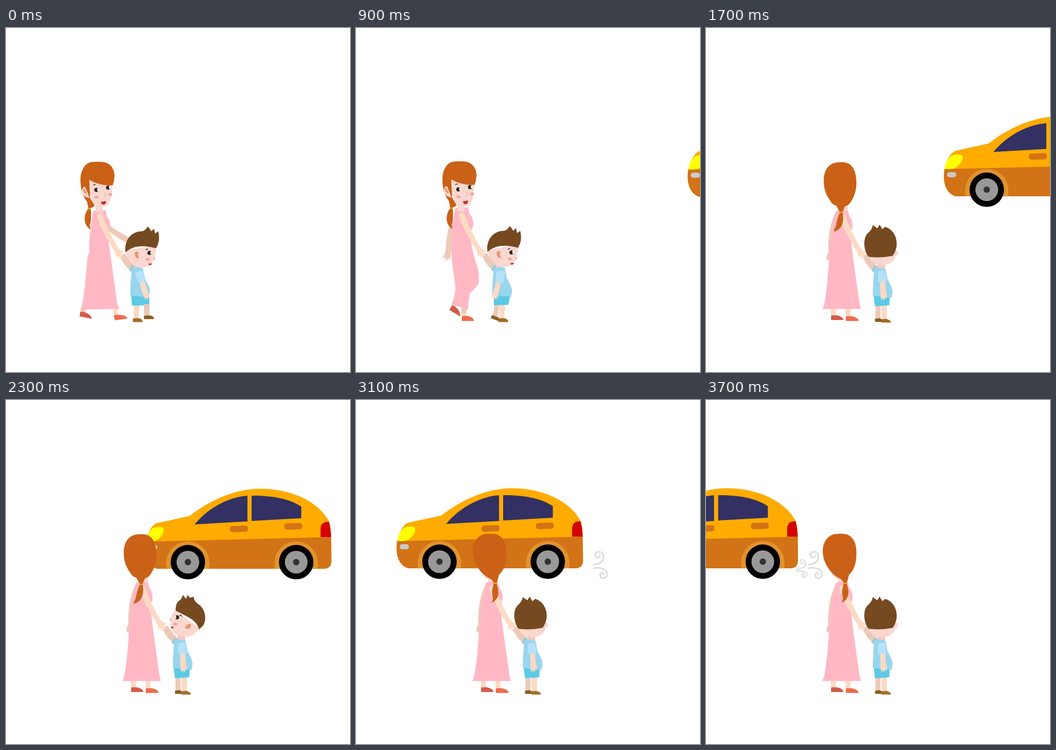
Animation of 748x748 px, one loop 3.9 s. Source, as an HTML page:

```html
<!DOCTYPE html>
<html lang="en">
<head>
<meta charset="utf-8">
<title>Waiting for the car</title>
<style>
html, body { margin: 0; width: 100%; height: 100%; overflow: hidden; background: #fff; }
svg { display: block; width: 100%; height: 100%; }
.hair { fill: #ca6117; } .face { fill: #fad7cf; } .skin { fill: #fcdac4; } .shade { fill: #eccab7; }
.dress { fill: #ffb8c4; } .shoeA { fill: #d45c49; } .shoeB { fill: #ef6c4d; }
.brown { fill: #754a21; } .shirt { fill: #9ad5ee; } .sleeve { fill: #b5e2fa; } .cuff { fill: #a0cbdb; }
.shorts { fill: #5ccae5; } .bootA { fill: #8b5f22; } .bootB { fill: #a26c27; }
.ear { fill: #e6946f; } .blush { fill: #f2a69d; } .lips { fill: #c9302e; } .dark { fill: #2b2624; } .white { fill: #fff; }
.line { fill: none; stroke: #2b2624; stroke-width: 1.5; }
.nose { fill: none; stroke: #dfa99d; stroke-width: 1; }
.band { fill: none; stroke: #f5b400; stroke-width: 2; }
.yellow { fill: #ffab00; } .rust { fill: #d27317; } .arch { fill: #e2932d; } .glass { fill: #333163; }
.puff { fill: none; stroke: #e0e0e0; stroke-linecap: round; }
</style>
</head>
<body>
<svg viewBox="0 0 748 748">
<defs>
  <g id="wheel">
    <path class="arch" d="M243.5,366.500V354.500A47,47 0 0 1 337.5,354.500V366.500Z"/>
    <circle cx="290.5" cy="352.600" r="37.5"/>
    <circle cx="290.5" cy="352.600" r="24.7" fill="#999"/>
    <circle cx="290.5" cy="352.600" r="7" fill="#333"/>
  </g>
  <path id="handle" class="rust" d="M389,274L415,273Q421,273 421,280T415,286.5L389,287.500Q382,287.500 382,280.500T389,274Z"/>
  <g id="eye">
    <circle class="dark" r="4.600"/>
    <path class="white" d="M2,-2.500A2.500,2.500 0 0 1 4.500,2L3,2.500Q1,1 2,-2.500Z"/>
  </g>

  <g id="momHead">
    <path class="face" d="M195,380H210V400H195Z"/>
    <path class="face" d="M180,325L183,365Q188,379 196,386Q205,391 214,389C225,386 231,368 231,340Z"/>
    <path class="hair" d="M162,333C161,310 172,293 186,291.500Q200,290 212,291.500C230,294 238,312 235.500,326Q235,334 232,342C215,343 195,339 181,330L183,370L193,386Q186,393 179,392L176,377C167,366 162,350 162,333Z"/>
    <path class="face" d="M172,345C164,344 162,362 173,367L182,370Z"/>
    <path class="ear" d="M170,348C166,352 168,361 176,360Z"/>
    <path class="hair" d="M179,393Q186,391 185,406Q185,424 182,428L184,438C173,432 168,418 173,404Q175,397 179,393Z"/>
    <path class="band" d="M178,391.500L185,394"/>
    <use href="#eye" x="196.500" y="352"/>
    <use href="#eye" x="222" y="347"/>
    <path class="line" d="M190,342Q192,339 195,341"/>
    <ellipse class="blush" cx="197" cy="368" rx="5" ry="3"/>
    <ellipse class="blush" cx="226.500" cy="362" rx="4.500" ry="3"/>
    <path class="nose" d="M214,357L216,366L213,368"/>
    <path class="lips" d="M206.500,378L217.500,376Q218,384 212,384Q207,384 206.500,378Z"/>
  </g>
  <path id="momArm" class="skin" d="M198,411C197,402 208,401 211,409C219,430 230,455 243,477L250,484L258,487L252,490L256,498L251,495L250,503L246,496L245,502L242,495L239,499L238,489C225,468 205,435 198,411Z"/>

  <g id="boyReach">
    <path class="shade" d="M257,489L277,513L272,527Q259,520 249,499Z"/>
    <path class="cuff" d="M274,515L282,517L278,535L267,526Z"/>
  </g>
  <path id="shirt" class="shirt" d="M274,522Q286,518 298,523L302,545Q314,565 313,574L311,586L270,581Q271,540 274,522Z"/>
  <g id="boyHead">
    <path class="face" d="M279,512H296V522H279Z"/>
    <path class="face" d="M261,484C262,507 280,521 298,520.500C317,520 327,500 326,472Z"/>
    <path class="ear" d="M322,498L324,502L321,506Z"/>
    <path class="brown" d="M260,488C256,465 270,442 296,442Q304,440 308,431.500Q313,436 316,442L322,436L324,447L331,442C335,458 332,470 326,479C300,471 275,473 260,488Z"/>
    <path class="ear" d="M280,488Q286,484 288,488L287,495L289,501Q281,502 280,492Z"/>
    <use href="#eye" x="312" y="489"/>
    <path class="line" d="M304,483Q306,480 309,481"/>
    <ellipse class="blush" cx="308.500" cy="503" rx="5" ry="3"/>
    <path class="lips" d="M310,512L318,512Q315,517 311,515.500Z"/>
  </g>
</defs>

<g id="car">
  <path class="yellow" d="M197,325Q197,314 200,303C203,288 213,271 222,268L295,252C333,221 392,193 446,193C520,192 578,225 598,265Q602,282 602,298L602.500,350Q602.500,367 585,367H223C205,362 197,343 197,325Z"/>
  <path class="rust" d="M198,308L602,298L602.500,350Q602.500,367 585,367H223C204,362 195,342 198,308Z"/>
  <path class="glass" d="M305,270.500C335,234 380,211 420,208V264Z"/>
  <path class="glass" d="M429,208C475,207 515,216 537,232V257L429,263Z"/>
  <use href="#handle"/>
  <use href="#handle" x="118" y="-5.500"/>
  <path fill="#ff0" d="M199,307C201,293 208,280 218,277C228,275 238,276 238,281C239,291 230,300 222,305Q214,309 199,307Z"/>
  <rect x="204" y="314.500" width="20" height="11" rx="5.500" fill="#ccc"/>
  <path fill="#d20000" d="M579,298V278Q581,266 592,265H597.500Q601,280 602,298Z"/>
  <use href="#wheel"/>
  <use href="#wheel" x="235.500"/>
  <g id="small" class="puff" stroke-width="3">
    <path d="M598,370C609,368 619,364 619,356C619,346 607,346 607.500,353C608,359 615,358 614,353"/>
    <path d="M599,374C611,372 622,374 622,380C622,388 610,388 611,382C612,377 617,378 616,382"/>
  </g>
  <g id="big" class="puff" stroke-width="4">
    <path d="M626,359.500C638,357.500 647,352 647,342C647,328 629,328 629.500,338C630,346 640,346 639,339"/>
    <path d="M626,366.500C641,363.500 655,370 655,380C654,391 639,391 640,381C641,374 649,375 647,381"/>
  </g>
</g>

<g id="stride">
  <path class="shade" d="M222,427C235,438 252,446 268,456L264,468C250,461 232,449 223,441Z"/>
  <path class="shade" d="M163,609L173,610L172,620L162,618Z"/>
  <path class="shoeA" d="M161.500,617C172,616 185,623 187,632.500L160,627Z"/>
  <path class="skin" d="M231,609H242L244,625L236,627Z"/>
  <path class="shoeB" d="M234,625C247,621 262,625 264,632L237,635.500Z"/>
  <path class="dress" d="M190,397L216,396.500Q219,401 218,408C228,418 228,433 222,441C221,458 227,490 231,520L242,600L246,611L162,612L165,604C172,570 174,530 177,500Q178,492 181,489C180,460 184,430 190,397Z"/>
  <use href="#boyReach"/>
  <path class="shade" d="M300,599H312V627H300Z"/>
  <path class="bootA" d="M300,626Q322,622 321.500,633H300Z"/>
  <path class="skin" d="M278,602H290L288,633H277Z"/>
  <path class="bootB" d="M276,632Q297,628 297,639.500H276Z"/>
  <path class="shorts" d="M272,579L311,583L312,600L300,601V603L274,604Z"/>
  <use href="#boyHead"/>
  <use href="#shirt"/>
  <path class="sleeve" d="M280,534Q290,526 299,529L304,549L290,555Q284,545 280,534Z"/>
  <path class="skin" d="M291,554L301,550Q307,570 312,580L313,588L309,584L308,591L305,586L303,591L300,584Q294,570 291,554Z"/>
  <use href="#momArm"/>
  <use href="#momHead"/>
</g>

<g id="step">
  <path class="shade" d="M209,416L214,425Q209,470 206,495L205,507L202,499L199,508L197,499L193,507L194,498L188,501Q194,490 195.500,480C196,460 200,430 209,416Z"/>
  <path class="shade" d="M210,596L219,602L215,610L207,606Z"/>
  <path class="shoeA" d="M209,603Q226,609 227,627.500L203,613Z"/>
  <path class="shade" d="M229,606H241L240,622H229Z"/>
  <path class="skin" d="M229,621H240V628H230Z"/>
  <path class="shoeB" d="M230,627Q252,623 257,637H230Z"/>
  <path class="dress" d="M216,391L244,390Q246,398 246,404C258,415 257,432 250,439C249,480 258,500 264,520Q268,535 267,555Q257,570 247,577L243,613L208,600Q217,580 216,560C212,530 206,500 208,470C207,440 212,415 216,391Z"/>
  <use href="#boyReach" x="26" y="-1"/>
  <path class="shade" d="M301,601H312L308,629L298,626Z"/>
  <path class="bootA" d="M296,624L311,630L312,638L293,631Z"/>
  <path class="skin" d="M312,601H324L322,633H311Z"/>
  <path class="bootB" d="M310,632Q331,628 331,639.500H310Z"/>
  <path class="shorts" d="M299,580L335,584L331,602L300,603Z"/>
  <use href="#boyHead" x="26" y="-1"/>
  <use href="#shirt" x="26" y="-1"/>
  <path class="sleeve" d="M306,530Q314,525 324,530L321,554L303,551Z"/>
  <path class="skin" d="M304,552L315,554Q313,568 309,577L310,587L306,584L305,592L302,586L299,592L298,585L295,589V580Q302,570 304,552Z"/>
  <use href="#momArm" x="26" y="-2"/>
  <use href="#momHead" x="26" y="-1"/>
</g>

<g id="stand">
  <path class="shade" d="M281,402L284,410C273,440 274,475 269,498L267,507L264,503L262,506L262,497L266,488C265,460 268,430 281,402Z"/>
  <path class="skin" d="M271,609H282V628H272ZM303,609H314V630H304Z"/>
  <path class="shoeA" d="M272,625L282,624.500Q297,626 299,635H272Z"/>
  <path class="shoeB" d="M304,627L314,626.500Q330,628 332,637H304Z"/>
  <path class="face" d="M287,380H308V399H287Z"/>
  <path class="dress" d="M283,396.500H309L311,407Q321,420 318,436L314,441C316,480 323,520 334,601L337,611H253L256,604C264,570 265,530 268,500C271,460 273,430 283,396.500Z"/>
  <g transform="translate(-.5 1)">
    <use href="#boyReach" x="93"/>
    <path class="shade" d="M369,601H380V632H369Z"/>
    <path class="bootA" d="M368,631L378,630Q385,632 386,638H368Z"/>
    <path class="skin" d="M382,601H394V634H382Z"/>
    <path class="bootB" d="M382,632.500L392,631.500Q403,634 403,639.500H382Z"/>
    <path class="shorts" d="M365,581L400,585L399,602L368,604Z"/>
    <path fill="#f5c8c3" d="M373,511H390V523H373Z"/>
    <use href="#shirt" x="93"/>
    <path class="sleeve" d="M375,530Q382,525 390,527L393,550L374,552Z"/>
    <path class="skin" d="M379,551L390,550Q390,570 394,580L393,587L390,585L388,592L385,586L382,591L380,583Z"/>
  </g>
  <use href="#momArm" x="92"/>
  <g id="tailLeft">
    <path class="face" d="M300,389Q315,388 318,371L300,370Z"/>
    <path class="hair" d="M256,333C256,305 270,292 290,292Q300,291 308,294C322,299 328,320 327,340C326,360 318,378 307,386L302,388L297,400H291L283,386Q276,386 269,374C261,362 256,350 256,333Z"/>
    <path class="hair" d="M291,402L297,401Q300,415 296,428Q290,440 278,443Q278,437 282,432Q286,410 291,402Z"/>
    <path class="band" d="M290.500,400.500H298"/>
  </g>
  <g id="tailRight">
    <path class="face" d="M272,372Q276,390 295,391L300,375Z"/>
    <path class="hair" d="M254,333C252,308 267,291 286,291Q297,290 305,292C322,297 328,316 327,335C327,355 322,370 311,380L306,399H300Q296,390 289,387C274,380 256,358 254,333Z"/>
    <path class="hair" d="M300,399H305.500Q311,412 309,425Q306,436 295,441L298,432Q293,415 300,399Z"/>
    <path class="band" d="M299.500,398.500H306"/>
  </g>
  <g id="boyBack" transform="translate(-.5 1.500)">
    <path class="face" d="M349,486Q358,514 382,514.500C403,514 413,503 413,488Z"/>
    <ellipse class="face" cx="413.500" cy="488" rx="4.500" ry="6"/>
    <path class="brown" d="M354,496C342,480 342,455 352,445Q362,437 363,427L373,434L378,426L384,436L390,431C408,436 417,455 415,473Q412,488 406,494Q380,499 354,496Z"/>
  </g>
  <g id="boyLeft">
    <path class="face" d="M367,457C356,470 355,492 363,503C375,519 408,521 420,496Z"/>
    <path class="ear" d="M359,473Q355,479 358.500,481Z"/>
    <path class="brown" d="M369,458Q368,440 380,434L385,424L391,432L396,423.500L399,430L408,428Q409,438 417,443C432,452 438,475 429,490L420,499C414,476 390,470 369,458Z"/>
    <path class="ear" d="M389,496Q394,485 402,487Q403,496 396,497.500Z"/>
    <use href="#eye" transform="translate(372 472.500) scale(-1 1)"/>
    <path class="line" d="M377,469Q381,466 383,471"/>
    <ellipse class="blush" cx="368" cy="487" rx="4.500" ry="3.500"/>
    <path class="lips" d="M358.500,492L365,494Q363,498 360,497Z"/>
  </g>
</g>
</svg>
<script>
const LOOP = 3900;
const parts = ["stride", "step", "stand", "tailLeft", "tailRight", "boyBack", "boyLeft", "small", "big"];
const waitBack = "stand tailLeft boyBack", waitLeft = "stand tailLeft boyLeft", watch = "stand tailRight boyBack";

// start ms, walkers' x, car's left edge, car's bounce, visible parts
const steps = [
  [0, 0, 800, 0, "stride"],
  [500, 7, 800, 0, "stride"],
  [700, 14, 800, 0, "step"],
  [900, 26, 721, 0, "step"],
  [1100, 27, 676, 0, "stride"],
  [1300, 82, 654, 0, "stride"],
  [1500, 83, 548, 0, "stride"],
  [1700, 0, 517, -1, waitBack],
  [1900, 0, 446, 0, waitBack],
  [2100, 0, 374, 0, waitBack],
  [2300, 0, 302, 0, waitLeft],
  [2500, 0, 236, -1, waitLeft + " big"],
  [2700, 0, 197, 0, waitLeft + " small"],
  [2900, 0, 126, 0, waitLeft + " small big"],
  [3100, 0, 88, -1, watch + " big"],
  [3300, 0, 20, 0, watch + " small"],
  [3500, 0, -28, 0, watch + " small big"],
  [3700, 0, -205.5, -1, watch + " small big"]
];

const el = id => document.getElementById(id);
const shift = (id, x, y = 0) => el(id).setAttribute("transform", `translate(${x} ${y})`);
let shown = null;

function draw() {
  const t = performance.now() % LOOP;
  const step = steps.findLast(s => s[0] <= t);
  if (step !== shown) {
    const [, x, car, bounce, list] = shown = step;
    const on = list.split(" ");
    for (const id of parts) el(id).style.display = on.includes(id) ? "" : "none";
    shift("stride", x);
    shift("step", x - 26);
    shift("car", car - 197, bounce);
  }
  requestAnimationFrame(draw);
}
draw();
</script>
</body>
</html>
```
